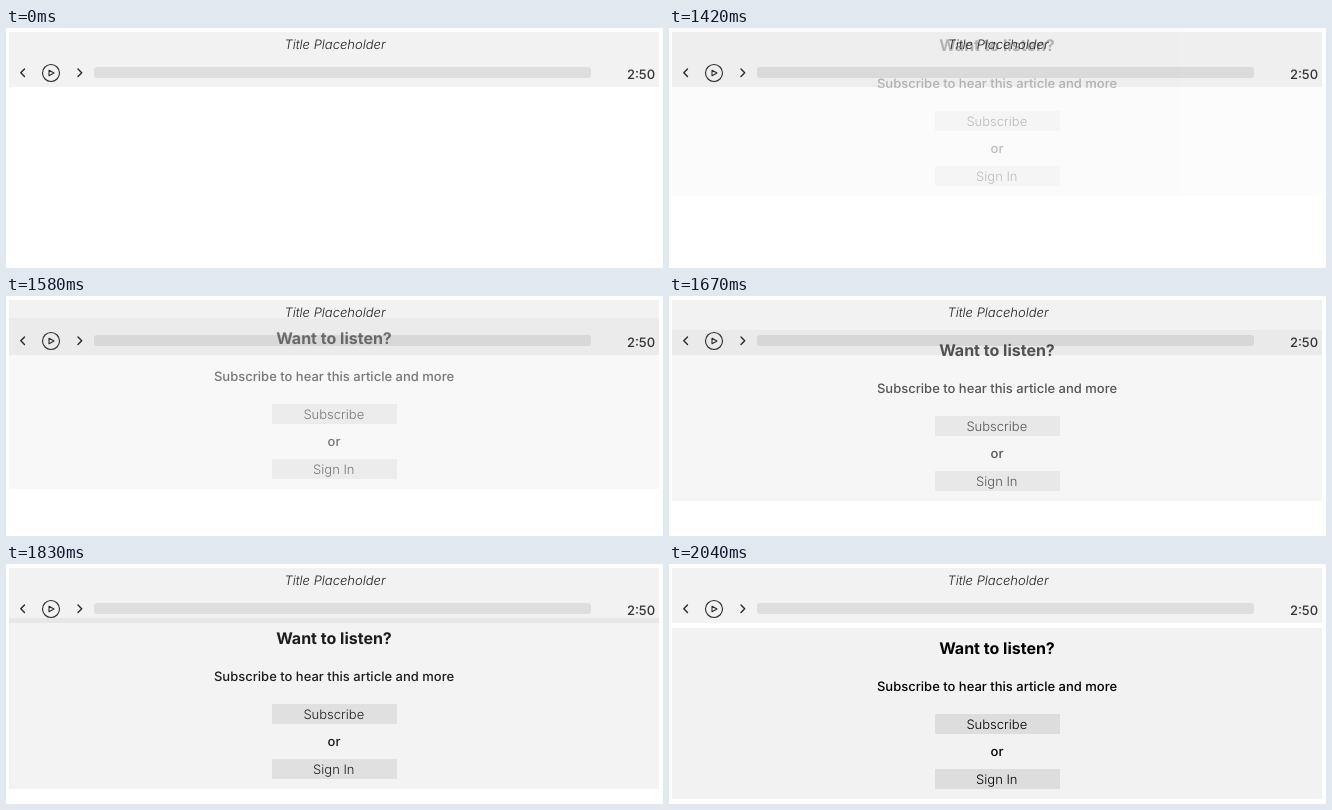
Recreate the animation shown at these times as an HTML page. Size 657 px wide and 240 px high, loop 2.96 s.

```html
<!DOCTYPE html>
<html lang="en">
<head>
<meta charset="utf-8">
<title>Audio player prompt</title>
<style>
  html, body { margin: 0; width: 100%; height: 100%; overflow: hidden; background: #fff; }
  svg { display: block; width: 657px; height: 240px; }
  text { font: 500 13px Inter, sans-serif; text-anchor: middle; text-rendering: geometricPrecision; }
  .heading { font-size: 16px; font-weight: 700; }
  .label { font-weight: 300; }
  .title { font-weight: 300; font-style: italic; fill: #222; }
  .time { fill: #333; }
  .icons { fill: none; stroke: #2b2b2b; stroke-linecap: round; stroke-linejoin: round; }
</style>
</head>
<body>
<svg viewBox="0 0 657 240">
  <g id="panel">
    <rect x="3" y="64" width="650" height="171" fill="#f2f2f2"/>
    <text class="heading" x="328" y="90">Want to listen?</text>
    <text x="328" y="127">Subscribe to hear this article and more</text>
    <rect x="266" y="150" width="125" height="20" fill="#ddd"/>
    <text class="label" x="327.8" y="165">Subscribe</text>
    <text x="328" y="192">or</text>
    <rect x="266" y="205" width="125" height="20" fill="#ddd"/>
    <text class="label" x="327.8" y="220">Sign In</text>
  </g>
  <!-- The player is translucent, so the panel shows through it. -->
  <g>
    <rect x="3" y="4" width="650" height="55" fill-opacity=".052"/>
    <rect x="88" y="39" width="497" height="11" rx="3" fill-opacity=".083"/>
    <text class="title" x="329" y="21">Title Placeholder</text>
    <text class="time" x="635" y="51">2:50</text>
    <g class="icons">
      <g stroke-width="1.4">
        <path d="M18.5 41 L14.8 44.8 L18.5 48.6"/>
        <path d="M72 41 L75.7 44.8 L72 48.6"/>
      </g>
      <circle cx="45" cy="45" r="8.5" stroke-width="1.1"/>
      <path d="M43 42.3 V47.7 L48 45 Z" stroke-width="1.1"/>
    </g>
  </g>
</svg>
<script>
  const LOOP = 2960, SHOW_AT = 1250, LAST_STEP = 19;
  const STEPS_PER_TICK = 0.24;   // 24 steps per second, ticks of 10 ms
  const EASE_START = 0.165, EASE_PER_STEP = 0.0441;
  const TRAVEL = 90;
  const panel = document.getElementById('panel');

  function progressAt(time) {
    if (time < SHOW_AT) return 0;
    const ticks = Math.floor((time - SHOW_AT) / 10);
    const step = Math.min(LAST_STEP, Math.floor((ticks + 0.49) * STEPS_PER_TICK));
    const x = Math.min(1, EASE_START + step * EASE_PER_STEP);
    return (1 - Math.cos(Math.PI * x)) / 2;
  }

  function render(time) {
    const p = progressAt(time);
    panel.setAttribute('opacity', p);
    panel.setAttribute('transform', `translate(0 ${Math.round((p - 1) * TRAVEL)})`);
  }

  const start = performance.now();
  function tick() {
    render((performance.now() - start) % LOOP);
    requestAnimationFrame(tick);
  }
  tick();
</script>
</body>
</html>
```
